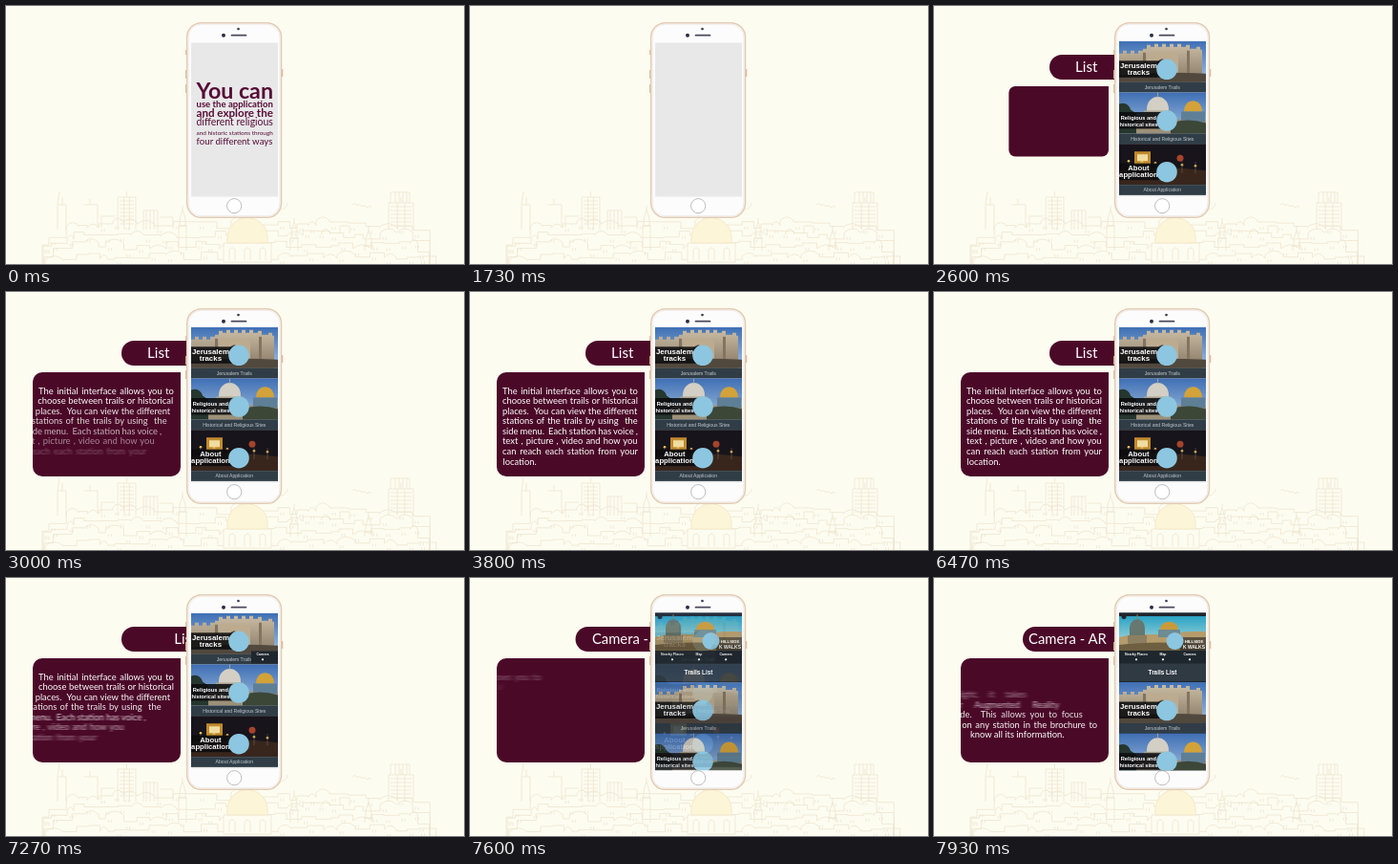
An HTML page for the animation above (8000 ms loop, 480 px wide and 270 px high).

```html
<!DOCTYPE html>
<html lang="en">
<head>
<meta charset="utf-8">
<title>App guide</title>
<style>
  html, body { margin: 0; width: 100%; height: 100%; overflow: hidden; background: #fdfcf0; }
  svg { display: block; width: 100%; height: 100%; }
  text { font-family: Lato, "Open Sans", sans-serif; white-space: pre; }
  .app text { font-family: "Liberation Sans", Arial, sans-serif; }
</style>
</head>
<body>
<svg id="stage" viewBox="0 0 480 270">
  <defs>
    <clipPath id="screenClip"><rect x="194" y="36.2" width="91" height="165"/></clipPath>
    <clipPath id="panelClip"><path id="panelMask"/></clipPath>
    <linearGradient id="sky" x2="0" y2="1">
      <stop offset="0" stop-color="#3f6fb4"/><stop offset="1" stop-color="#a3c0df"/>
    </linearGradient>
    <linearGradient id="teal" x2="0" y2="1">
      <stop offset="0" stop-color="#2aa3c4"/><stop offset="1" stop-color="#c3e2e0"/>
    </linearGradient>
    <linearGradient id="stone" x2="0" y2="1">
      <stop offset="0" stop-color="#c9bba3"/><stop offset="1" stop-color="#857763"/>
    </linearGradient>
  </defs>
  <rect width="480" height="270" fill="#fdfcf0"/>
  <g id="city" fill="none" stroke="#ede4cf" stroke-width=".75"></g>
  <g id="pill">
    <rect id="pillBox" y="51" height="26" rx="13" fill="#4b0928"/>
    <text id="listLabel" y="69" font-size="15.2" fill="#fff">List</text>
    <text id="cameraLabel" y="69" font-size="14.8" fill="#fff">Camera - AR</text>
  </g>
  <path id="panel" fill="#4b0928"/>
  <g id="copy" clip-path="url(#panelClip)" fill="#fff"></g>
  <g id="phone">
    <path d="M188.8 46v5M188.8 67v9M188.8 82v9M289.6 66v8" stroke="#d9b994" stroke-width="1.4"/>
    <rect x="189.7" y="17.7" width="98.8" height="203.6" rx="15" fill="#fcfcfc" stroke="#e3cbb2" stroke-width="1.5"/>
    <rect x="191.2" y="19.2" width="95.8" height="200.6" rx="13.5" fill="none" stroke="#ebe6e4" stroke-width=".8"/>
    <circle cx="243.5" cy="24" r="1.3" fill="#35354a"/>
    <circle cx="228" cy="30.7" r="2" fill="#2d2d42"/>
    <path d="M236.5 30.7h15" stroke="#4b4759" stroke-width="1.7" stroke-linecap="round"/>
    <rect x="194" y="38.5" width="91" height="161" fill="#e8e8e9"/>
    <circle cx="239.2" cy="209.2" r="7.6" fill="#fff" stroke="#bdbdc0" stroke-width="1"/>
  </g>
  <g id="intro" fill="#560c35"></g>
  <g class="app" clip-path="url(#screenClip)">
    <g id="home"></g>
    <g id="cameraTile"></g>
    <g id="trails"></g>
  </g>
</svg>
<script>
const NS = 'http://www.w3.org/2000/svg';
const LOOP = 8000;
const $ = id => document.getElementById(id);
const pen = document.createElement('canvas').getContext('2d');

function add(parent, tag, attrs, text) {
  const el = document.createElementNS(NS, tag);
  set(el, attrs);
  if (text) el.textContent = text;
  parent.appendChild(el);
  return el;
}
function set(el, attrs) {
  for (const k in attrs) el.setAttribute(k, attrs[k]);
}
function measure(text, size, weight = 400) {
  pen.font = `${weight} 100px Lato, "Open Sans", sans-serif`;
  return pen.measureText(text).width * size / 100;
}
const clamp = v => Math.max(0, Math.min(1, v));
const span = (t, a, b) => clamp((t - a) / (b - a));
const smooth = u => u * u * (3 - 2 * u);
const easeOut = u => 1 - (1 - u) ** 3;

// ---- skyline ----
function drawCity() {
  const g = $('city');
  let seed = 11;
  const rnd = () => (seed = (seed * 16807) % 2147483647) / 2147483647;
  const line = (d, extra = {}) => add(g, 'path', { d, ...extra });

  for (let layer = 0; layer < 4; layer++) {
    let d = `M${38 + layer} 272`;
    for (let x = 38 + layer; x < 434;) {
      const w = 7 + rnd() * 13;
      const edge = Math.min(1, (x - 22) / 34, (448 - x) / 26);
      const top = 273 - edge * (40 - layer * 11) - rnd() * 9;
      d += `V${top.toFixed(1)}`;
      d += rnd() < .22 ? `q${w / 2} -8 ${w} 0` : `h${w.toFixed(1)}`;
      if (rnd() < .6) line(`M${x + 3} ${top + 5}v3m3 -3v3`);
      x += w;
    }
    line(d + 'V272');
  }
  const tower = (x, w, top, floors) => {
    line(`M${x} 234V${top}h${w}V234M${x + w / 2} ${top}v-6`);
    for (let i = 1; i <= floors; i++) line(`M${x + 2} ${top + i * 4}h${w - 4}`);
    line(`M${x + w * .35} ${top}V234M${x + w * .65} ${top}V234`);
  };
  tower(117, 19, 200, 7);
  tower(401, 26, 206, 6);
  line('M54 234V208h9V234M54 208l2 -14m3 14v-8M82 208h14v24M88 208v-6M100 232v-12h14');
  line('M403 206V195H423V206M408 195v11m4 -11v11m4 -11v11m4 -11v11');
  line('M144 234V214h15V234M147 214v20m4 -20v20m4 -20v20M161 221h14v12');
  const minaret = (x, top) =>
    line(`M${x - 4} 256V${top + 17}h8V256M${x - 5} ${top + 17}h10M${x - 3} ${top + 17}v-7l3 -10l3 10v7M${x} ${top}v-4`);
  minaret(185, 213); minaret(302, 226); minaret(380, 234);
  line('M281 215c8 -2 13 -2 14 -9M330 239q5 -12 10 0M350 238v-8h10v8');
  line('M363 208q3 -3 5 1q3 -3 5 1q3 -3 5 1q3 -3 5 0');
  line('M228 248h50v20h-50z', { fill: '#fdfcf0' });
  line('M232 248C228 213 278 213 274 248Z', { fill: '#fdf5d8', stroke: '#f0e5c2' });
  line('M253 221v-5M234 266v-11q3 -4 6 0v11M250 266v-11q3 -4 6 0v11M266 266v-11q3 -4 6 0v11');
}

// ---- opening words, each set to the column width ----
function drawIntro() {
  const rows = [
    ['You can', 97, 700], ['use the application', 106, 700], ['and explore the', 115.6, 700],
    ['different religious', 125, 400], ['and historic stations through', 135, 400], ['four different ways', 144.8, 400]
  ];
  for (const [text, y, weight] of rows)
    add($('intro'), 'text', { x: 199.5, y, 'font-weight': weight, 'font-size': 80.5 / measure(text, 1, weight) }, text);
}

// ---- app screens ----
const rect = (g, x, y, width, height, fill, extra = {}) => add(g, 'rect', { x, y, width, height, fill, ...extra });
const label = (g, x, y, size, text, extra = {}) =>
  add(g, 'text', { x, y, 'font-size': size, 'text-anchor': 'middle', fill: '#fff', ...extra }, text);
const shape = (g, d, fill) => add(g, 'path', { d, fill });
const badge = (g, cx, cy, r) => add(g, 'circle', { cx, cy, r, fill: '#8cc6e0' });

const scenes = {
  gate(g) {
    rect(g, 194, 0, 91, 43, 'url(#sky)');
    shape(g, 'M194 13h4v-3h4v3h4v-3h4v3h4v-3h5v-2h4V4h4v2h4V3h4v3h4V3h4v3h4V3h4v3h4V3h4v3h5V4h4v4h7V6h4v3h2V43H194Z', 'url(#stone)');
    shape(g, 'M223 12h33v24h-33z', '#bcab8f');
    shape(g, 'M234 34V22q5 -7 10 0v12z', '#564a3b');
    shape(g, 'M265 10h3v26h-3zM219 12h3v24h-3z', '#83745f');
    shape(g, 'M194 36q40 -5 91 -2v9h-91z', '#51483e');
  },
  dome(g) {
    rect(g, 194, 0, 91, 43, 'url(#sky)');
    shape(g, 'M194 12q9 -3 12 6l6 4v21h-18z', '#26372f');
    shape(g, 'M212 28h73v15h-73z', '#9c9078');
    shape(g, 'M223 30V18C223 0 246 0 246 18V30Z', '#d3cfc5');
    shape(g, 'M234 5v-5h1v5zM220 19h29v12h-29z', '#a9a191');
    shape(g, 'M262 20C262 5 281 5 281 20Z', '#d3a239');
    shape(g, 'M259 20h25v11h-25z', '#5f7f96');
    shape(g, 'M248 32q18 -6 37 0v11h-37z', '#3d4738');
  },
  night(g) {
    rect(g, 194, 0, 91, 43, '#17141b');
    shape(g, 'M194 27q45 -5 91 1v15h-91z', '#38261d');
    shape(g, 'M210 8h17v14h-17z', '#c08a2c');
    shape(g, 'M213 11h11v7h-11z', '#f0dca0');
    for (let i = 0; i < 6; i++) {
      add(g, 'circle', { cx: 204 + i * 14, cy: 18 + (i * 7) % 6, r: 1.3, fill: '#f3c65c' });
      rect(g, 203.7 + i * 14, 19, .6, 12, '#74604a');
    }
    add(g, 'circle', { cx: 258, cy: 15, r: 3.5, fill: '#a5432c' });
  }
};

function row(parent, y, scene, words, size, caption) {
  const g = add(parent, 'g', { transform: `translate(0 ${y})` });
  scenes[scene](g);
  rect(g, 194, 20.5, 44, 17.5, '#0c0c0e', { opacity: .88 });
  words.forEach((w, i) => label(g, 214.4, 28 + i * 7, size, w, { 'font-weight': 700 }));
  badge(g, 244, 29.5, 10.8);
  rect(g, 194, 43, 91, 10.7, '#303d47');
  label(g, 239.3, 50, 5.1, caption, { fill: '#c3c9ce' });
}
function tracks(g, y) { row(g, y, 'gate', ['Jerusalem', 'tracks'], 7.9, 'Jerusalem Trails'); }
function sites(g, y) { row(g, y, 'dome', ['Religious and', 'historical sites'], 5.7, 'Historical and Religious Sites'); }
function menuItem(g, x, text) {
  label(g, x, 81, 3.5, text, { 'font-weight': 700 });
  add(g, 'circle', { cx: x, cy: 85.3, r: 1.1, fill: '#fff' });
}

function drawApp() {
  const home = $('home');
  tracks(home, 36.8);
  sites(home, 90.5);
  row(home, 144.2, 'night', ['About', 'application'], 7.7, 'About Application');

  const tile = $('cameraTile');
  rect(tile, 257, 76.5, 28, 13, '#1f272e');
  menuItem(tile, 269, 'Camera');

  const g = $('trails');
  rect(g, 194, 36, 91, 167, '#1f272e');
  rect(g, 194, 40, 91, 36, 'url(#teal)');
  shape(g, 'M194 62l14 -3h38l20 -3h19v20h-91z', '#b59c6c');
  shape(g, 'M237 54C237 43 256 43 256 54Z', '#c99a3a');
  shape(g, 'M235 54h23v8h-23z', '#6f8b93');
  shape(g, 'M205 62V53C205 40 221 40 221 53V62Z', '#66786f');
  shape(g, 'M212.5 43v-5h1v5zM203 60h20v10h-20z', '#8d7f62');
  shape(g, 'M194 70q40 -5 91 0v6h-91z', '#6e5f41');
  add(g, 'circle', { cx: 199, cy: 40.5, r: 2.5, fill: '#20262c' });
  rect(g, 258, 62, 27, 14, '#2c2a25', { opacity: .65 });
  badge(g, 252.5, 66, 9);
  label(g, 272.5, 67.5, 4.3, 'HILLSIDE', { 'font-weight': 700 });
  label(g, 272.5, 73.5, 5, 'K WALKS', { 'font-weight': 700 });
  menuItem(g, 212, 'Nearby Places');
  menuItem(g, 240, 'Map');
  menuItem(g, 268, 'Camera');
  rect(g, 194, 89.5, 91, 18.5, '#303a43');
  label(g, 239.5, 101, 6.4, 'Trails List', { 'font-weight': 700 });
  tracks(g, 109);
  sites(g, 162.7);
}

// ---- panel copy ----
function makeCopy(lines, top, pitch, lastX) {
  const size = 9.4, width = 142.5;
  return lines.map((text, i) => {
    const last = i === lines.length - 1;
    const gap = last ? 0 : (width - measure(text, size)) / (text.split(' ').length - 1);
    const id = `blur${top}-${i}`;
    const filter = add(document.querySelector('defs'), 'filter',
      { id, filterUnits: 'userSpaceOnUse', x: -200, y: 80, width: 500, height: 120 });
    const blur = add(filter, 'feGaussianBlur', { stdDeviation: '0 0' });
    const el = add($('copy'), 'text',
      { x: last ? lastX : 34, y: top + i * pitch, 'font-size': size, 'word-spacing': gap }, text);
    return { el, blur, id };
  });
}
function placeLine(line, shift, fade) {
  const alpha = clamp(1 - shift / fade);
  set(line.el, { transform: `translate(${-shift} 0)`, opacity: alpha });
  if (shift > .8 && alpha > 0) {
    set(line.blur, { stdDeviation: `${Math.min(2, shift * .035)} 0.15` });
    set(line.el, { filter: `url(#${line.id})` });
  } else line.el.removeAttribute('filter');
}

drawCity();
drawIntro();
drawApp();
const listCopy = makeCopy([
  'The initial interface allows you to', 'choose between trails or historical',
  'places.  You can view the different', 'stations of the trails by using  the',
  'side menu.  Each station has voice ,', 'text , picture , video and how you',
  'can reach each station from your', 'location.'
], 106.7, 10.55, 34.5);
const cameraCopy = makeCopy([
  'Through the light, it takes', 'you for Augmented Reality', 'mode.  This allows you to focus',
  'on any station in the brochure to', 'know all its information.'
], 125, 10.6, 38);

const TRAVEL = 155;
const away = (ms, length) => TRAVEL * Math.max(0, ms / length) ** 2;

// three round corners, the upper right one square
function panelPath(k) {
  const w = 155 * k, h = 109 * k, r = 10 * k;
  return `M183 84v${h - r}a${r} ${r} 0 0 1 ${-r} ${r}h${2 * r - w}a${r} ${r} 0 0 1 ${-r} ${-r}` +
    `v${2 * r - h}a${r} ${r} 0 0 1 ${r} ${-r}Z`;
}

function render(t) {
  set($('intro'), { opacity: t < 1730 ? 1 : 0 });
  set($('home'), { opacity: span(t, 1790, 2130) });
  set($('cameraTile'), { opacity: span(t, 7060, 7220) });
  set($('trails'), { opacity: span(t, 7340, 7640) });

  const left = 121 + 72 * (1 - easeOut(span(t, 2060, 2520)));
  const pillX = left - 28 * smooth(span(t, 7460, 7800));
  set($('pillBox'), { x: pillX, width: 226 - pillX });
  set($('pill'), { opacity: t < 2060 ? 0 : 1 });
  set($('listLabel'), { x: left + 27 + 45 * span(t, 7070, 7324) ** 2 });
  set($('cameraLabel'), { x: 99 + 95 * (1 - easeOut(span(t, 7480, 7850))), opacity: t < 7480 ? 0 : 1 });

  // the panel grows out of its upper right corner
  const d = panelPath(smooth(span(t, 2010, 2965)));
  set($('panel'), { d });
  set($('panelMask'), { d });

  listCopy.forEach((line, i) => {
    if (t < 5000) placeLine(line, away(3000 + i * 36 - t, 500), 40);
    else placeLine(line, away(t - 7270 + (i - 1) * 50, 347), 160);
  });
  cameraCopy.forEach((line, i) => placeLine(line, away(7930 + (4 - i) * 63 - t, 350), 160));
}

function tick(now) {
  render(now % LOOP);
  requestAnimationFrame(tick);
}
render(0);
requestAnimationFrame(tick);
</script>
</body>
</html>
```
